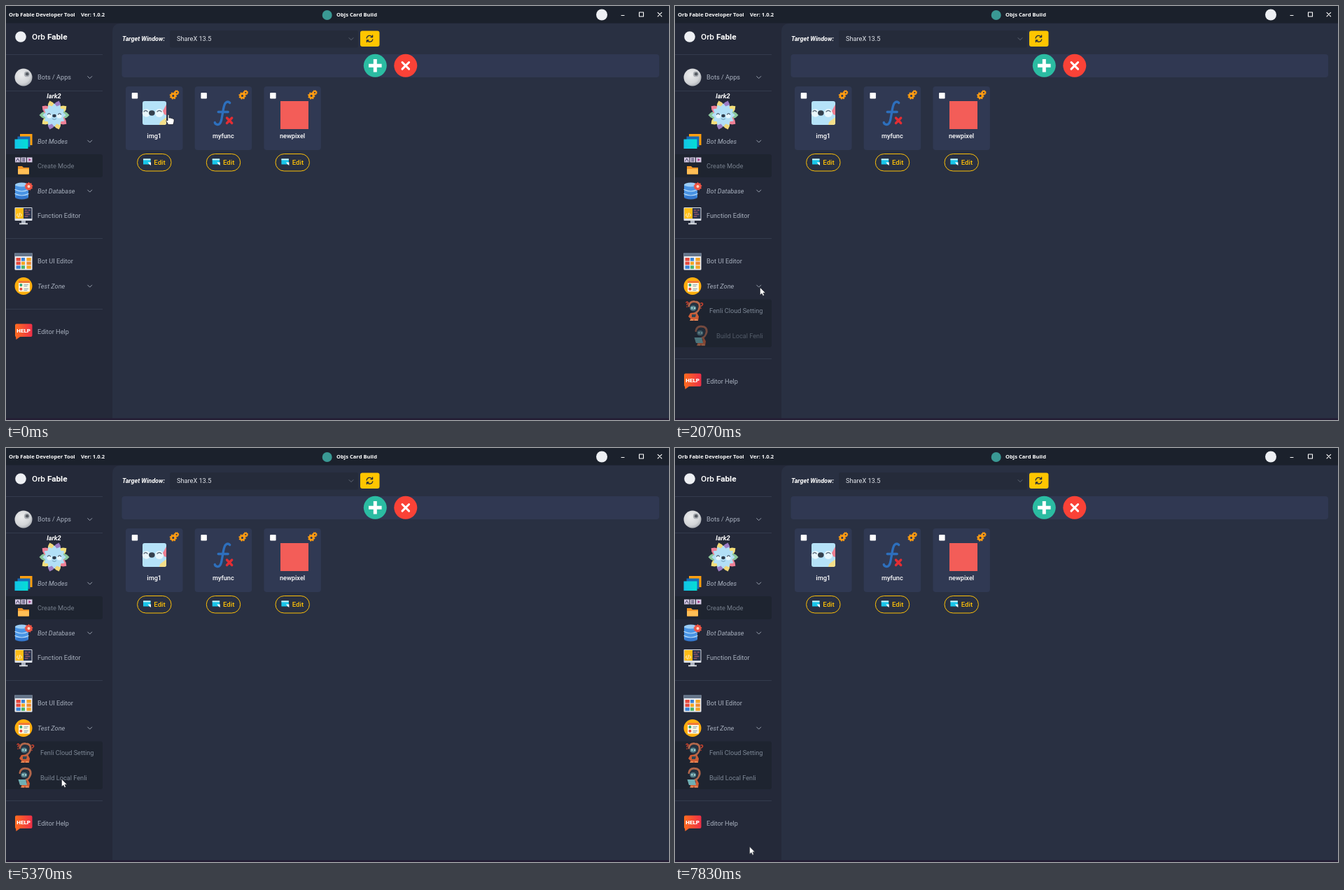
Animation, 947 px wide and 592 px high, one loop 8000 ms. Source, as an HTML page:

```html
<!DOCTYPE html>
<html lang="en">
<head>
<meta charset="utf-8">
<title>Objs Card Build</title>
<style>
html, body { margin: 0; width: 100%; height: 100%; overflow: hidden; background: #293042; }
svg { display: block; width: 947px; height: 592px; }
text { font: 9.2px Roboto, sans-serif; fill: #a8b0be; }
.bar { font: 700 7.6px "Open Sans", sans-serif; fill: #fff; }
.it { font-style: italic; }
.dim { fill: #757e8b; }
.soft { fill: #7d8896; }
.mid { text-anchor: middle; }
.white { fill: #fff; font-weight: 500; }
.bold { fill: #fff; font-weight: 700; font-style: italic; }
.edit { fill: #ffc107; font-weight: 500; font-size: 9.6px; }
.line { stroke: #343b4d; }
.pen { fill: none; stroke-linecap: round; stroke-linejoin: round; }
</style>
</head>
<body>
<svg viewBox="0 0 947 592" xmlns="http://www.w3.org/2000/svg">
  <defs>
    <radialGradient id="ball" cx=".4" cy=".35" r=".7"><stop offset="0" stop-color="#ecedee"/><stop offset=".7" stop-color="#d3d5d8"/><stop offset="1" stop-color="#a4a8ae"/></radialGradient>
    <linearGradient id="hot"><stop offset="0" stop-color="#ff6d1f"/><stop offset="1" stop-color="#ee2f48"/></linearGradient>
    <linearGradient id="sea"><stop offset="0" stop-color="#12c4e8"/><stop offset="1" stop-color="#04e0d4"/></linearGradient>
    <g id="gear"><circle r="3.3" fill="none" stroke="#ff9c12" stroke-width="3"/><circle r="5" fill="none" stroke="#ff9c12" stroke-width="1.8" stroke-dasharray="2.1 1.83"/></g>
    <path id="chev" class="pen" d="M-3-1.4 0 1.6 3-1.4" stroke="#9aa2b0"/>
    <g id="bot">
      <path d="M-5 3-8 8-5 11-4 14H6L7 8 4 2z" fill="#cf5d35"/>
      <path d="M-3 5H3L2 9H-3z" fill="#2d4655"/>
      <path class="pen" d="M-7-7Q-6-14 1-13.3 9-13 8-5 6 1 2 3" stroke="#b3674b" stroke-width="3"/>
      <ellipse cx="0" cy="-5" rx="6.3" ry="6.8" fill="#243443"/>
      <ellipse cx="-1.2" cy="-4" rx="4.3" ry="3.6" fill="#5a8690"/>
      <circle cx="-2.7" cy="-4.2" r="1" fill="#c4f5f1"/><circle cx="1" cy="-4" r="1" fill="#c4f5f1"/>
      <path d="M-5 12H-1V14H-6zM1 12H5L6 14H1z" fill="#e98b58"/>
    </g>
  </defs>

  <rect width="947" height="592" fill="#242939"/>
  <path d="M152 592V37Q152 25 164 25H947V592z" fill="#293042"/>
  <rect width="947" height="24.5" fill="#1b212c"/>
  <rect y="589.5" width="947" height="2.5" fill="#241d34"/>

  <text class="bar" x="4" y="14.5">Orb Fable Developer Tool</text>
  <text class="bar" x="107" y="14.5">Ver: 1.0.2</text>
  <circle cx="458.7" cy="13" r="7" fill="#3a9994"/>
  <text class="bar" x="472" y="14.5">Objs Card Build</text>
  <circle cx="851" cy="12.5" r="8" fill="#eef0f4"/>
  <path class="pen" d="M879 13.5H883M904.5 9H910.5V15H904.5zM931 9.3 936.6 14.9M936.6 9.3 931 14.9" stroke="#fff" stroke-width="1.1"/>

  <circle cx="21" cy="44" r="7.8" fill="#eef0f4"/>
  <text x="37" y="48" style="font-size:11.8px;font-weight:500;fill:#fff">Orb <tspan font-weight="700">Fable</tspan></text>
  <path class="line" d="M0 69.5H138M0 121.5H138M0 332.5H138"/>
  <text class="bold mid" x="68.5" y="131.5">lark2</text>
  <g id="mascot" transform="translate(69 156)"></g>
  <path d="M0 212H135Q138 212 138 215V242Q138 245 135 245H0z" fill="#1e2430"/>
  <g id="menu"></g>

  <g id="sub">
    <path d="M0 419.5H135Q138 419.5 138 422.5V485Q138 488 135 488H0z" fill="#1e2430"/>
    <g id="sub1">
      <use href="#bot" x="27" y="436"/>
      <path class="pen" d="M16 424Q18 422 19 424.5L17 427M37 425Q40 424 39.5 427L37.5 429M17 430V430.2M37 432V432.2" stroke="#d0422d" stroke-width="1.5"/>
      <text class="soft" x="49" y="439.4">Fenli Cloud Setting</text>
    </g>
    <g id="sub2">
      <use href="#bot" x="27" y="471.5"/>
      <path d="M17.5 474H28L30 482H20z" fill="#6fb0b4"/>
      <text class="soft" x="49" y="474.9">Build Local Fenli</text>
    </g>
  </g>

  <g id="foot">
    <path class="line" d="M0 433.5H138"/>
    <rect id="hoverHelp" y="449" width="151" height="33" fill="#1e2430"/>
    <path d="M15 454.5H35.5Q37.5 454.5 37.5 456.5V471Q37.5 473 35.5 473H20L14.5 477 14 473Q13 473 13 471V456.5Q13 454.5 15 454.5z" fill="url(#hot)"/>
    <text class="mid" x="25.2" y="466.9" style="font-size:8px;font-weight:900;fill:#fff">HELP</text>
    <text x="45" y="469.2">Editor Help</text>
  </g>

  <text class="bold" x="166" y="50" style="font-size:9px">Target Window:</text>
  <rect x="234" y="35" width="269" height="24.5" rx="3" fill="#252b3a"/>
  <text x="244" y="50.1" style="fill:#e3e6ec">ShareX 13.5</text>
  <use href="#chev" x="493" y="47" opacity=".5"/>
  <rect x="506" y="35.5" width="27.5" height="22.5" rx="3" fill="#ffc600"/>
  <path class="pen" d="M515.2 46A4.4 4.4 0 0 1 523 44M523.8 47.8A4.4 4.4 0 0 1 516 49.5M523.6 42V44.6H521M515.4 51.6V49H518" stroke="#252b3a" stroke-width="1.3"/>
  <rect x="165.5" y="69" width="767.5" height="33" rx="4" fill="#303852"/>
  <circle cx="527.3" cy="85.3" r="16.5" fill="#2bbca2"/>
  <path d="M527.3 76V94.6M518 85.3H536.6" stroke="#fff" stroke-width="5"/>
  <circle cx="570.8" cy="85.3" r="16.5" fill="#fa4237"/>
  <path class="pen" d="M566 80.5 575.6 90.1M575.6 80.5 566 90.1" stroke="#fff" stroke-width="3"/>
  <g id="cards"></g>

  <g id="cursor">
    <path id="arrow" d="M.5.5V11.3L3 9 4.7 12.4 6.5 11.6 4.9 8.2H8.2z" fill="#fff" stroke="#10141c" stroke-width=".5"/>
    <path id="hand" d="M-1 .8Q0-.6 1 .8V5.2L2.5 4.8 3.6 5.5 5 5.3 5.8 6.2Q8 5.8 8 7.6V10Q7.6 12 6.6 14.6H-.2Q-1.6 12-3.4 9.2-3.6 7.6-1 9z" fill="#fff" stroke="#10141c" stroke-width=".7"/>
  </g>
</svg>

<script>
const $ = id => document.getElementById(id);
const LOOP = 8000;
const rect = (x, y, w, h, fill, r = 0) =>
  `<rect x="${x}" y="${y}" width="${w}" height="${h}" rx="${r}" fill="${fill}"/>`;
const circle = (x, y, r, fill) => `<circle cx="${x}" cy="${y}" r="${r}" fill="${fill}"/>`;
const pen = (d, color, w = 1) => `<path class="pen" d="${d}" stroke="${color}" stroke-width="${w}"/>`;

function star(n, outer, inner) {
  const points = [];
  for (let i = 0; i < 2 * n; i++) {
    const r = i % 2 ? inner : outer, a = i * Math.PI / n;
    points.push((r * Math.sin(a)).toFixed(1) + "," + (-r * Math.cos(a)).toFixed(1));
  }
  return points.join(" ");
}

// Spiky avatar
const petals = ["#9b7cc4", "#f4df7a", "#8cc89b", "#ef7f96", "#f0d878"];
let face = "";
for (let i = 0; i < 10; i++)
  face += `<path d="M-6.5-11-3.5-18 0-21.5 3.5-18 6.5-11z" fill="${petals[i % 5]}" transform="rotate(${i * 36 + 18})"/>`;
face += `<polygon points="${star(12, 16.8, 13)}" fill="#b2dff6"/>` +
  circle(-7, 1, 3.6, "#e6f6fd") + circle(7, 1, 3.6, "#e6f6fd") +
  pen("M-9.5-1Q-7.5-3.5-5.5-1M5.5-1Q7.5-3.5 9.5-1", "#33475c", 1.2) +
  `<ellipse cy="1" rx="2.7" ry="2.2" fill="#2d3b4c"/>` +
  pen("M-2.5 5.5Q0 7.5 2.5 5.5", "#6f9ab4");
$("mascot").innerHTML = face;

// Icons are drawn around their own centre
const tiles = ["#e5483d", "#3b82d6", "#f5a623", "#e5483d", "#f5a623", "#f08a32", "#3b82d6", "#4bb56a", "#f5a623"];
const icons = {
  ball: circle(0, 0, 12.5, "url(#ball)") + circle(4.8, -4.6, 3.9, "#a9adb3") + circle(5.2, -4.8, 2.3, "#565b62"),
  modes: rect(-5, -10.5, 17.5, 16, "#ff9f0f") + rect(-8.5, -7, 18, 15, "#1769b5") + rect(-12.5, -3, 19, 13.5, "url(#sea)"),
  folder: [-12, -3.5, 5].map(x => rect(x, -12.5, 7.5, 7, "#d5cae4")).join("") +
    pen("M-10.5-7-8.2-11-6-7M-1.5-10.8H2M-1.5-9H2M-1.5-7.2H2", "#41405f") +
    `<path d="M7.5-11 11-9 7.5-7z" fill="#a12b7a"/><path d="M-8 0H-2L0 2H8V11.5H-8z" fill="#ef9528"/>` + rect(-8, 4, 16, 7.5, "#ffbe55", 1),
  data: rect(-12, -9, 19, 18, "#4a94e4") +
    `<ellipse cx="-2.5" cy="9" rx="9.5" ry="3" fill="#3477cc"/><ellipse cx="-2.5" cy="-9" rx="9.5" ry="3" fill="#9bcdf7"/>` +
    pen("M-12-2Q-2.5 3 7-2M-12 4Q-2.5 9 7 4", "#bfe0fb", 1.2) +
    `<polygon points="${star(9, 6.2, 4.8)}" fill="#ee5545" transform="translate(7.5 -6.5)"/>` + circle(7.5, -6.5, 2, "#ffd9c8"),
  screen: rect(-12.5, -12, 25, 19, "#d9dde5", 1) + rect(-11.5, -11, 11.5, 15, "#ffbd16") + rect(0, -11, 11.5, 15, "#26324c") +
    pen("M-8-3-9.5-1-8 1M-4-3-2.5-1-4 1M-5.2-4-6.8 2", "#fff4cf") + pen("M2-8H5M7-8H9.5M2-5H7M3-2H9M2 1H6", "#c76878") +
    rect(-3, 7, 6, 4, "#aab1be") + rect(-6, 10.5, 12, 1.8, "#e3e6eb"),
  layout: rect(-12.5, -12, 25, 24.5, "#edf0f4", 1) + rect(-12.5, -12, 25, 5, "#65758a", 1) +
    tiles.map((c, i) => rect(-10.5 + i % 3 * 7.5, -5 + (i / 3 | 0) * 5.6, i % 3 == 1 ? 5 : 6.3, 4.6, c)).join(""),
  test: circle(0, 0, 12.5, "#ffae0d") + rect(-7, -7.5, 16, 15.5, "#fff6df", 1) + rect(-7, -7.5, 16, 3, "#f07835") +
    circle(-3.6, -1.6, 2, "#2aa773") + circle(-3.6, 4.3, 2, "#e84b3f") + pen("M1-2H6.5M1 0H5M1 4H6.5M1 6H5", "#8aa7b8")
};

// label, centre y, icon, text class, has submenu, hover id
const rows = [
  ["Bots / Apps", 102, "ball", "", 1],
  ["Bot Modes", 193.5, "modes", "it", 1],
  ["Create Mode", 229, "folder", "dim", 0],
  ["Bot Database", 264.5, "data", "it", 1],
  ["Function Editor", 300, "screen", "", 0],
  ["Bot UI Editor", 365, "layout", "", 0, "hoverUi"],
  ["Test Zone", 400.5, "test", "it", 1, "hoverTest"]
];
$("menu").innerHTML = rows.map(([label, y, icon, cls, more, hover]) =>
  (hover ? `<rect id="${hover}" y="${y - 16.5}" width="151" height="33" fill="#1e2430"/>` : "") +
  `<g transform="translate(25 ${y})">${icons[icon]}</g>` +
  `<text class="${cls}" x="45" y="${y + 3.3}">${label}</text>` +
  (more ? `<use href="#chev" x="119.7" y="${y}"/>` : "")).join("");

// Cards
const art = [
  rect(24, 21, 34, 34, "#b5e2f8", 3) + circle(29.5, 38, 5.8, "#e8f7fd") + circle(48, 38, 6, "#e8f7fd") +
    `<path d="M58 26 53 35 55 40 58 41z" fill="#ee7f91"/><path d="M58 44 49 51 48 55H55Q58 55 58 52z" fill="#f4df8a"/>` +
    `<ellipse cx="37.3" cy="38" rx="4.3" ry="3.7" fill="#34404d"/>` +
    pen("M26 36Q28.5 33 31 36M45 36Q48 33 51 36", "#5c6d7c", 1.4),
  pen("M50 23.5Q47 20.5 43.5 24 41.5 27 40 37L38 48Q36 55.5 32 54.5 29 54 28.5 51.5M33.5 36.5H47.5", "#2d6fbd", 3.3) +
    pen("M45.8 45 53 52.5M53 45 45.8 52.5", "#e42d33", 3.4),
  rect(23.6, 21, 40, 40, "#f35d58")
];
$("cards").innerHTML = ["img1", "myfunc", "newpixel"].map((name, i) =>
  `<g transform="translate(${171 + i * 98.7} 115)">` +
  rect(0, 0, 81.5, 91, "#303953", 4) + rect(8.7, 9, 8.5, 8.5, "#fff", 1) + art[i] +
  `<use href="#gear" transform="translate(67.8 13.4) scale(.88)"/><use href="#gear" transform="translate(72.6 8.8) scale(.62)"/>` +
  `<text class="white mid" x="40.7" y="74.3">${name}</text>` +
  `<rect x="16.6" y="96.5" width="48.4" height="24.5" rx="12.2" fill="none" stroke="#ffc107"/>` +
  rect(25, 103.5, 10.5, 8, "#18c5e9", .5) + rect(25, 103.5, 10.5, 1.8, "#d9f6fb") +
  `<path d="M31.5 108.5H36V113L34 111.5z" fill="#f5f7fa"/>` +
  `<text class="edit" x="40.3" y="112.1">Edit</text></g>`).join("");

// Motion
function play(id, frames) {
  $(id).animate(frames.map(([t, style, easing = "linear"]) => ({ offset: t / LOOP, easing, ...style })),
    { duration: LOOP, iterations: Infinity });
}
const move = (x, y = 0) => ({ transform: `translate(${x}px, ${y}px)` });

// Shows an element only between two times
function show(id, from, to) {
  const steps = [[0, from > 0 ? 0 : 1]];
  if (from > 0) steps.push([from, 1]);
  if (to < LOOP) steps.push([to, 0]);
  steps.push([LOOP, to < LOOP ? 0 : 1]);
  play(id, steps.map(([t, opacity]) => [t, { opacity }, "step-end"]));
}

const path = [
  [0, 232, 155], [330, 232, 155, "ease-in-out"], [1130, 113, 401], [1230, 113, 401, "ease-in-out"],
  [1500, 121, 402], [2670, 121, 402, "ease-in"], [2810, 128, 440], [2970, 118.5, 480],
  [3080, 115, 482, "ease-out"], [3470, 88, 476], [3500, 87, 476, "ease-out"], [3770, 79, 473],
  [5380, 79, 473, "ease-out"], [5500, 97, 473], [5700, 97, 473, "ease-in"], [5880, 104, 469, "ease-out"],
  [6100, 98, 464], [6310, 98, 464], [6330, 97, 464], [6500, 97, 464, "ease-in-out"],
  [6740, 86, 485], [6800, 86, 486], [7270, 86, 486, "ease-in-out"], [7830, 106, 569.5], [LOOP, 106, 569.5]
];
play("cursor", path.map(([t, x, y, ease]) => [t, move(x, y), ease]));
show("hand", 0, 640);
show("arrow", 640, LOOP);

const OPEN = 1770;
show("hoverUi", 860, 960);
show("hoverTest", 960, OPEN);
show("hoverHelp", 7510, 7650);
show("sub", OPEN, LOOP);
play("foot", [[0, move(0), "step-end"], [OPEN, move(0, 71), "step-end"], [LOOP, move(0, 71)]]);

function slideIn(id, from, to) {
  const out = { opacity: 0, ...move(24) }, rest = { opacity: 1, ...move(0) };
  play(id, [[0, out], [from, out], [to, rest], [LOOP, rest]]);
}
slideIn("sub1", OPEN, 2030);
slideIn("sub2", 1920, 2180);
</script>
</body>
</html>
```
